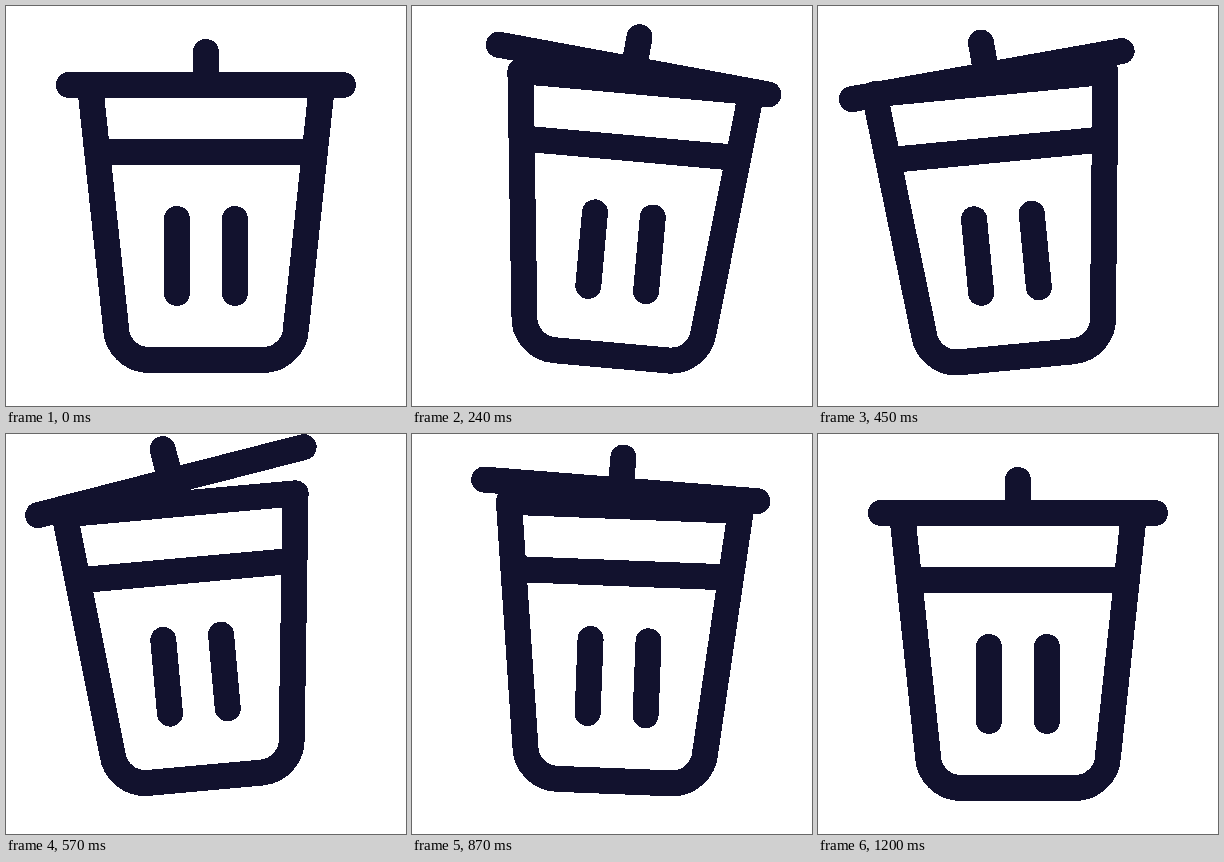
An HTML page for the animation above (3.23 s loop, 400 px wide and 400 px high).

```html
<!DOCTYPE html>
<html lang="en">
<head>
<meta charset="utf-8">
<title>Trash can</title>
<style>
  html, body { margin: 0; width: 100%; height: 100%; overflow: hidden; background: #fff; }
  svg { display: block; width: 100%; height: 100%; }
  path {
    fill: none;
    stroke: #12122e;
    stroke-width: 26;
    stroke-linecap: round;
    stroke-linejoin: round;
    shape-rendering: crispEdges;
  }
</style>
</head>
<body>
<svg viewBox="0 0 400 400">
  <!-- the can rocks on its foot and carries the lid, which turns on its middle -->
  <g id="can" transform="translate(200 354)">
    <path d="M-116 -275H116L90 -32A33 33 0 0 1 57 0H-57A33 33 0 0 1 -90 -32Z"/>
    <path d="M-108 -208H108M-29 -141V-67M29 -141V-67"/>
    <g id="lid" transform="translate(0 -275)">
      <path d="M-137 0H137M0 0V-33"/>
    </g>
  </g>
</svg>
<script>
  const LOOP = 3230, STEP = 30;
  const can = document.getElementById('can');
  const lid = document.getElementById('lid');

  const ease = u => (1 - Math.cos(Math.PI * u)) / 2;

  // Starts at 0 and eases to each [time, value] turning point, then holds.
  function swing(...turns) {
    return t => {
      let from = 0, since = 0;
      for (const [time, value] of turns) {
        if (t < time) return from + (value - from) * ease((t - since) / (time - since));
        from = value;
        since = time;
      }
      return from;
    };
  }

  const rock = swing([200, 5.7], [495, -6.2], [840, 2.7], [1000, -2.6], [1200, 0]);
  const hop = swing([210, 5], [370, 1], [640, 12], [1150, 0]);
  const drift = swing([450, -1.5], [980, 2.4], [1200, 0]);
  const tilt = swing([240, 5.3], [580, -9.2], [790, 2.5], [1200, 0]);
  const lift = swing([220, 12], [360, 3.5], [710, 34], [1000, 2.5], [1080, 6.5], [1200, 0]);

  function place(el, x, y, angle) {
    el.setAttribute('transform', `translate(${x} ${y}) rotate(${angle})`);
  }

  const start = performance.now();

  function draw() {
    const now = (performance.now() - start) % LOOP;
    const t = Math.floor(now / STEP) * STEP;
    place(can, 200 + drift(t), 354 - hop(t), rock(t));
    place(lid, -0.3 * lift(t), -275 - lift(t), tilt(t));
    requestAnimationFrame(draw);
  }
  draw();
</script>
</body>
</html>
```
